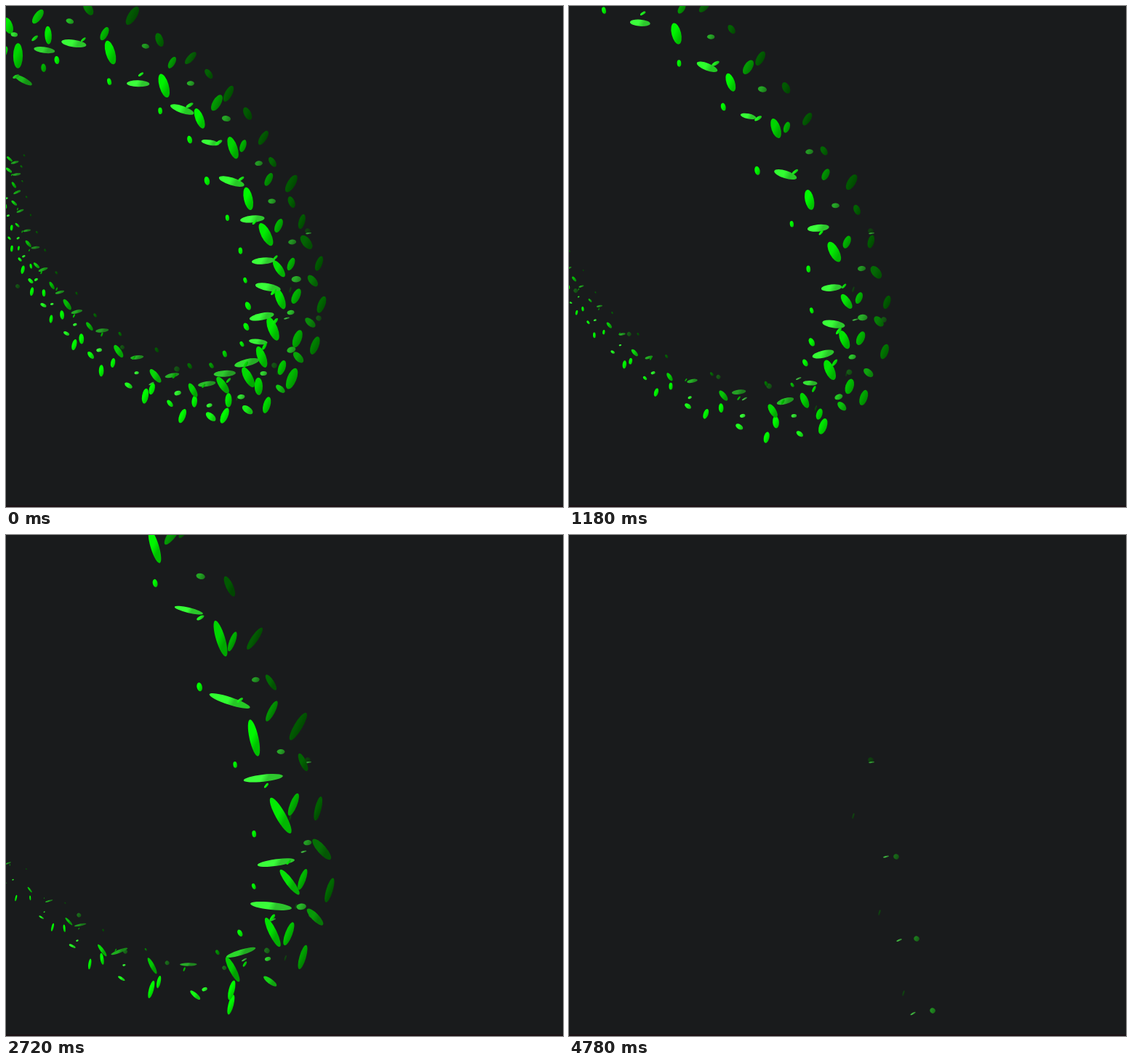
An HTML page with a canvas for the animation above (4.8 s loop, 766 by 690 pixels).

```html
<!DOCTYPE html>
<html>
<head>
<meta charset="utf-8">
<style>
  html, body { margin: 0; height: 100%; overflow: hidden; background: #191b1c; }
  canvas { display: block; }
</style>
</head>
<body>
<canvas id="stage" width="766" height="690"></canvas>
<script>
const ctx = document.getElementById('stage').getContext('2d');
const LOOP = 4.8, ANCHOR = 0.206, PERIODS = 32;

// The unrolling tube: centre line, spread and stretch at key times
const times = [0, 0.7, 1.64, 2.28, 2.72, 3.46];
const spread = [1, 1.25, 1.5, 1.85, 2, 2.7];
const stretch = [1.2, 0.8, 1.3, 1.9, 1.9, 1];
const paths = [
  [-5,95, 60,30, 205,90, 300,180, 355,290, 383,395, 355,490, 262,532, 110,445, 22,320, 0,180],
  [-40,-30, 70,10, 195,75, 285,165, 350,280, 383,400, 372,490, 290,545, 130,495, 30,395, -25,280],
  [0,-180, 110,-40, 215,70, 290,185, 358,300, 387,410, 372,505, 300,570, 140,525, 20,420, -60,320],
  [40,-230, 130,-60, 235,65, 305,185, 355,300, 388,420, 380,515, 305,590, 145,560, 35,465, -70,350],
  [60,-260, 150,-80, 255,70, 315,190, 360,300, 390,420, 385,520, 315,605, 160,585, 50,505, -80,380],
  [100,-290, 190,-100, 270,70, 325,190, 365,310, 390,430, 393,530, 355,640, 200,695, 70,620, -80,520]
];

// offset in period, place across tube, angle, half length, half width, stretches, fades late
const strands = [
  [0.1, 0.95, 118, 11, 5.5, 1, 1],
  [0.5, 0.8, 60, 8, 5, 1, 1],
  [0.95, 0.4, 112, 9, 5, 1, 0],
  [0.42, 0.35, 0, 5.5, 3.5, 0, 0],
  [0, -0.1, 72, 12, 5.5, 1, 0],
  [0.62, -0.45, 8, 13, 4.5, 1, 0],
  [0.67, -0.2, -40, 5, 2, 0, 0],
  [0.26, -0.95, 80, 5, 3, 0, 0]
];

// Leading chain: x, y and their drift over the loop
const discs = [[415,310,0,0], [430,430,20,13], [369,495,109,61], [235,500,265,155],
  [160,470,300,270], [16,386,440,435], [-65,305,490,575], [-110,180,450,735]];
const dashes = [[416,313,0,0], [386,430,50,13], [291,505,163,53], [200,520,273,139]];
const slivers = [[391,391,0,-4], [374,504,53,16], [318,540,142,91]];

const clamp = (x, lo, hi) => Math.min(hi, Math.max(lo, x));
const mix = (a, b, k) => a + (b - a) * k;

function noise(n) {
  const x = Math.sin(n * 127.1 + 11.7) * 43758.5453;
  return (x - Math.floor(x)) * 2 - 1;
}

function curve(path, u) {
  const i = clamp(Math.floor(u), 0, 9), k = u - i;
  const axis = c => {
    const p = j => path[clamp(j, 0, 10) * 2 + c];
    const [a, b, d, e] = [p(i - 1), p(i), p(i + 1), p(i + 2)];
    return b + k / 2 * (d - a + k * (2 * a - 5 * b + 4 * d - e + k * (3 * (b - d) + e - a)));
  };
  return [axis(0), axis(1)];
}

function ellipsoid(x, y, a, b, angle, level, tint) {
  const shade = l => `rgb(${tint * l},${255 * l},${tint * l})`;
  const fill = ctx.createLinearGradient(x - b, y - b / 2, x + b, y + b / 2);
  fill.addColorStop(0.3, shade(level));
  fill.addColorStop(1, shade(level * 0.78));
  ctx.fillStyle = fill;
  ctx.beginPath();
  ctx.ellipse(x, y, a, b, angle * Math.PI / 180, 0, 7);
  ctx.fill();
}

function drawChain(t) {
  const q = Math.pow(t / 4.78, 1.35);
  const each = (rows, draw) => rows.forEach(([x, y, dx, dy], k) => draw(x + dx * q, y + dy * q, k));
  each(slivers, (x, y) => ellipsoid(x, y, 4, 1.2, 105, 0.27, 60));
  each(discs, (x, y, k) => {
    const r = k > 3 ? 3 : 3.8;
    ellipsoid(x, y, r, r * 0.92, 40, k ? 0.33 + Math.min(k, 3) * 0.07 * q : 0.25, 60);
  });
  each(dashes, (x, y, k) => ellipsoid(x, y, 4, 1.1, -8 - k * 7, k ? 0.72 : 0.6, 90));
}

function drawTube(t) {
  let i = 0;
  while (i < 4 && t > times[i + 1]) i++;
  const k = (t - times[i]) / (times[i + 1] - times[i]);
  const path = paths[i].map((v, j) => mix(v, paths[i + 1][j], k));
  const gap = mix(spread[i], spread[i + 1], k) / PERIODS;
  const long = Math.max(0.8, mix(stretch[i], stretch[i + 1], k));
  const leave = 1.2 * Math.max(0, (t - 3.46) / 0.86) ** 2;
  const last = t > 3.46 ? 8 : 21;

  strands.forEach(([offset, across, angle, a, b, stretches, fades], s) => {
    const fade = fades ? clamp((3.4 - t) * 4, 0, 1) : 1;
    if (!fade) return;
    for (let m = -8; m <= last; m++) {
      const seed = m * 9 + s;
      const v = ANCHOR + (m + offset + noise(seed) * 0.09) * gap - leave;
      if (v < 0 || v > 0.85) continue;
      const u = 10 * (1 - (1 - v) ** 2);
      const [x, y] = curve(path, u), [x2, y2] = curve(path, u + 0.02);
      const len = Math.hypot(x2 - x, y2 - y) || 1;
      const nx = (y2 - y) / len, ny = (x - x2) / len;
      const near = clamp(1.05 - (u - 6) * 0.23, 0.35, 1.05);
      const side = across + noise(seed + 400) * 0.15;
      const w = 46 * Math.max(near, 0.45) * side;
      const size = near ** (1 + t / 6) * (0.95 + noise(seed + 800) * 0.2) * fade;
      const tilt = angle - (u - 3) * 4 + noise(seed + 1200) * 12;
      const level = clamp(0.85 - 0.55 * side * (nx * 0.8 - ny * 0.6), 0.35, 1);
      const tint = 60 * Math.cos(tilt * Math.PI / 180) ** 4;
      ellipsoid(x + nx * w, y + ny * w, a * size * (stretches ? long : 1), b * size, tilt, level, tint);
    }
  });
}

function frame() {
  const t = performance.now() / 1000 % LOOP;
  ctx.fillStyle = '#191b1c';
  ctx.fillRect(0, 0, 766, 690);
  drawChain(t);
  if (t < 4.32) drawTube(t);
  ctx.fillStyle = '#1c1215';
  ctx.fillRect(0, 688, 766, 2);
  requestAnimationFrame(frame);
}
frame();
</script>
</body>
</html>
```
